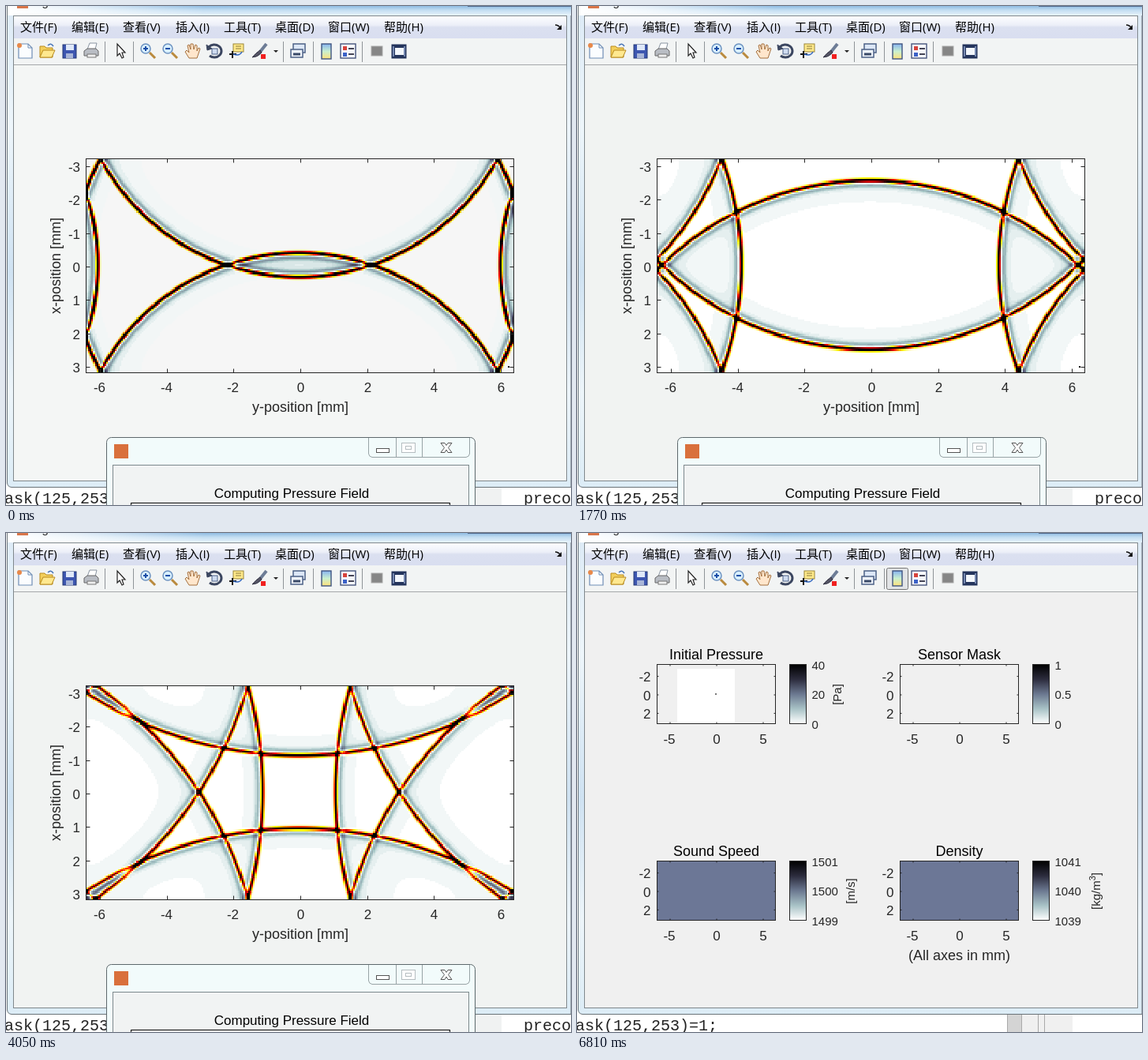
Write an HTML page with a canvas that moves like this. It is 716 px wide and 632 px high and loops after 8 s.

```html
<!DOCTYPE html>
<html lang="zh">
<head>
<meta charset="utf-8">
<title>Pressure field</title>
<style>
html, body { margin: 0; width: 100%; height: 100%; overflow: hidden; background: #fff; }
svg, canvas { position: absolute; left: 0; top: 0; }
canvas { left: 102px; top: 194px; width: 541px; height: 270px; image-rendering: pixelated; }
text { font-family: "Liberation Sans", Arial, sans-serif; fill: #262626; }
.menu text { font: 15px "Open Sans", "Noto Sans CJK SC", "Noto Sans CJK", sans-serif; fill: #000; }
.code text { font: 20px "Liberation Mono", monospace; fill: #222; }
</style>
</head>
<body>
<svg id="back" width="716" height="632" viewBox="0 0 716 632"></svg>
<canvas id="field" width="256" height="128"></canvas>
<svg id="front" width="716" height="632" viewBox="0 0 716 632"></svg>
<script>
const LOOP = 8000, NX = 256, NY = 128, CELL = 2.115;
const $ = id => document.getElementById(id);

// ---------- markup helpers ----------
const rect = (x, y, w, h, fill, more = '') =>
  `<rect x="${x}" y="${y}" width="${w}" height="${h}" fill="${fill}" ${more}/>`;
const path = (d, stroke, width = 1, fill = 'none') =>
  `<path d="${d}" stroke="${stroke}" stroke-width="${width}" fill="${fill}"/>`;
const text = (x, y, str, size, anchor = 'middle', more = '') =>
  `<text x="${x}" y="${y}" font-size="${size}" text-anchor="${anchor}" ${more}>${str}</text>`;
const upright = (x, y, str, size) =>
  text(0, 0, str, size, 'middle', `transform="translate(${x} ${y}) rotate(-90)"`);
const at = (x, body, y = 57) => `<g transform="translate(${x} ${y})">${body}</g>`;
const grad = (id, stops, dir = 'x2="0" y2="1"') =>
  `<linearGradient id="${id}" ${dir}>` +
  stops.map(([o, c]) => `<stop offset="${o}" stop-color="${c}"/>`).join('') + '</linearGradient>';

// ---------- window ----------
function lens(sign) {
  return path('M2 2L9 9', '#b98a3e', 3) +
    `<circle cx="-3" cy="-3" r="6" fill="#d8efff" stroke="#6c92c0" stroke-width="1.5"/>` +
    path(sign, '#1b4fa8', 2);
}

function toolbar() {
  const sheet = path('M-8 -9H4L9 -4V9H-8Z', '#6f8db5', 1.2, '#fbfdff') +
    path('M4 -9V-4H9', '#6f8db5') + `<circle cx="-7" cy="-7" r="3" fill="#e8894a"/>`;
  const folder = path('M-9 8V-6H-3L-1 -4H7V8Z', '#b98b1e', 1, '#f3cf5b') +
    path('M-9 8L-5 -1H10L6 8Z', '#b98b1e', 1, '#ffe88f') + path('M1 -7Q5 -11 8 -6', '#4a76b8', 1.5);
  const disk = rect(-8, -8, 17, 17, '#3d56b0', 'stroke="#253875"') +
    rect(-4, -8, 10, 7, '#dfe8f8') + rect(-4, 3, 9, 6, '#a9b6d8');
  const printer = path('M-5 -2L-2 -10H7L5 -2Z', '#8893a0', 1, '#fff') +
    path('M-9 0L-5 -3H6L9 0V6H-9Z', '#666', 1, '#b9bdc4') + rect(-5, 4, 11, 4, '#eee', 'stroke="#777"');
  const pointer = path('M-5 -9V6L-2 3L1 9L3 8L1 2H5Z', '#222', 1.2, '#fff');
  const hand = path('M-4 9L-9 1L-7 -1L-4 2L-6 -7L-4 -8L-2 -2L-2 -9L1 -9L2 -2L4 -8L6 -7L6 0L8 -4L10 -3L6 9Z',
    '#a5713f', 1, '#ffe6cc');
  const spin = path('M-7 -5A9 8 0 1 1 -6 6', '#3b4660', 3) + path('M-10 -8L-9 -1L-3 -3Z', '#3b4660', 1, '#3b4660') +
    rect(-3, -3, 7, 7, '#cfdcf0', 'stroke="#4c6187"');
  const tip = rect(-4, -9, 13, 10, '#ffe98a', 'stroke="#9a8638"') +
    path('M-1 -6H6M-1 -3H6', '#8a7a3c') + path('M-9 4H0M-5 0V9', '#111', 2) + path('M-4 4Q4 7 7 1', '#3468c0', 1.5);
  const brush = path('M9 -9L1 1', '#6d7c96', 4) + path('M1 -1Q-4 2 -9 8Q-2 8 3 2Z', '#334', 1, '#556') +
    rect(2, 4, 6, 6, '#f02020');
  const linked = rect(-6, -9, 15, 11, '#dce7f6', 'stroke="#4c6187" stroke-width="1.5"') +
    rect(-9, -2, 15, 10, '#eef3fa', 'stroke="#4c6187" stroke-width="1.5"') + path('M-6 4H3', '#3a4a68', 3);
  const bar = rect(-6, -9, 12, 19, 'url(#rain)', 'stroke="#3f5580" stroke-width="1.4"');
  const legend = rect(-9, -9, 19, 18, '#f7f9fd', 'stroke="#46557c" stroke-width="1.4"') +
    rect(-6, -6, 5, 5, '#d8433c') + rect(-6, 2, 5, 5, '#3c62c8') + path('M1 -3H8M1 4H8', '#445', 2);
  const gray = rect(-7, -6, 14, 12, '#868686', 'stroke="#aaa"');
  const dock = rect(-9, -8, 18, 17, '#24345c', 'stroke="#24345c"') + rect(-5, -4, 11, 9, '#f2f6fc') +
    path('M-7 -6V7M7 -6V7', '#8ea2cc', 1.5);
  const seps = [125, 161, 351, 389, 451].map(x => path(`M${x}.5 45V71`, '#8f9498')).join('');
  const icons = [[24, sheet], [52, folder], [80, disk], [108, printer], [146, pointer],
    [180, lens('M-6 -3H0M-3 -6V0')], [208, lens('M-6 -3H0')], [236, hand], [264, spin],
    [292, tip], [321, brush], [370, linked], [406, bar], [433, legend], [470, gray], [498, dock]];
  return rect(10, 41, 700, 33, '#f2f4f4') +
    rect(392.5, 44.5, 27, 27, '#e2e4e6', 'id="pressed" stroke="#777" rx="2"') + seps +
    icons.map(([x, body]) => at(x, body)).join('') +
    path('M339 56H345L342 59Z', 'none', 0, '#222') + path('M10 74.5H710', '#a5a8aa');
}

function chrome() {
  const menus = [[18, '文件(F)'], [83, '编辑(E)'], [148, '查看(V)'], [215, '插入(I)'],
    [276, '工具(T)'], [341, '桌面(D)'], [408, '窗口(W)'], [479, '帮助(H)']];
  return '<defs>' +
    grad('glass', [[0, '#8fbbe2'], [.45, '#c4def2'], [1, '#e8f3fb']]) +
    grad('glow', [[0, '#fff'], [.12, 'rgba(255,255,255,.75)'], [.35, 'rgba(255,255,255,0)']], 'x2="1" y2="0"') +
    grad('side', [[0, '#dceaf6'], [.25, '#eef6fb'], [.55, '#cfe2f2'], [.8, '#edf5fa'], [1, '#dcecf6']]) +
    grad('menu', [[0, '#fdfdff'], [.4, '#eceff8'], [.5, '#dbe0f0'], [1, '#d9def0']]) +
    grad('rain', [[0, '#88b4f0'], [.5, '#c9f0d0'], [1, '#ffe27a']]) + '</defs>' +
    rect(0, 0, 716, 632, '#fff') + rect(594, 609, 34, 23, '#f0f2f2') +
    `<g class="code">${text(-14, 630, 'mask(125,253)=1;', 20, 'start')}` +
    text(656, 630, 'preco', 20, 'start', 'id="aside"') + '</g>' +
    '<g id="strip">' + rect(545, 609, 18, 23, '#d4d4d4') + rect(564, 609, 64, 23, '#f0f0f0') +
    path('M545.5 609V632M563.5 609V632M584.5 609V632M592.5 609V632', '#aaa') + '</g>' +
    path('M1.5 0V604Q2 609 7 609.5H716V0Z', '#6a7378', 1, 'url(#side)') +
    rect(2, 0, 714, 12, 'url(#glass)') + rect(2, 0, 714, 12, 'url(#glow)') + path('M585 .5H716', '#51698c') +
    rect(14, 0, 14, 3, '#d9764a') + text(33, 0, 'Figure', 15, 'start') +
    rect(9.5, 12.5, 701, 589, '#f1f3f2', 'id="panel" stroke="#80888c"') +
    rect(10, 13, 700, 28, 'url(#menu)') + path('M10 41.5H710', '#b4b8c4') +
    '<g class="menu">' + menus.map(([x, s]) => text(x, 32, s, 15, 'start')).join('') + '</g>' +
    path('M696 24Q700 24 703 28', '#111', 1.6) + path('M704 24V30H698Z', 'none', 0, '#111') +
    toolbar();
}

function dialog() {
  return rect(127.5, 546.5, 467, 100, '#f2fbfb', 'rx="6" stroke="#5d686c"') +
    rect(137, 555, 18, 18, '#d9703c') +
    path('M459.5 547V567Q460 571 464 571.5H583Q587 571 587.5 567V547M494.5 547V571M527.5 547V571', '#98a3a6') +
    rect(469.5, 560.5, 16, 5, '#fff', 'stroke="#555"') +
    rect(501.5, 553.5, 17, 12, '#fff', 'stroke="#b5bdc0"') + rect(506.5, 557.5, 7, 4, '#fff', 'stroke="#b5bdc0"') +
    path('M551 553.5H556L558 556.5L560 553.5H565L560.5 559.5L565 565.5H560L558 562L556 565.5H551L555.5 559.5Z', '#555', 1, '#fff') +
    rect(135.5, 581.5, 451, 60, '#f1f3f3', 'stroke="#7d888c"') +
    text(362, 623, 'Computing Pressure Field', 17, 'middle', 'style="fill:#000"') +
    rect(158.5, 629.5, 404, 20, '#fff', 'stroke="#000"');
}

// ---------- axes ----------
function frame(x, y, w, h, xs, ys, len) {
  const r = x + w, b = y + h;
  const d = xs.map(v => `M${v} ${y}v${len}M${v} ${b}v${-len}`).join('') +
    ys.map(v => `M${x} ${v}h${len}M${r} ${v}h${-len}`).join('');
  return rect(x, y, w, h, 'none', 'stroke="#262626"') + path(d, '#262626');
}

function waveAxes() {
  const step = 42.35, xs = [-6, -4, -2, 0, 2, 4, 6], ys = [-3, -2, -1, 0, 1, 2, 3];
  const px = v => Math.round(373 + v * step) + .5, py = v => Math.round(330 + v * step) + .5;
  return frame(101.5, 193.5, 542, 271, xs.map(px), ys.map(py), 5) +
    xs.map(v => text(px(v) - (v < 0 ? 1 : 0), 489, v, 17)).join('') +
    ys.map(v => text(94, py(v) + 6, v, 17, 'end')).join('') +
    text(373, 514, 'y-position [mm]', 18) + upright(69, 329, 'x-position [mm]', 18) +
    rect(636, 456, 2, 2, '#000');
}

function summary() {
  const plot = (x, y, title, fill, marks, unit, ux) => {
    const xs = [-5, 0, 5].map(v => [v, x + 75.5 + v * 11.8]);
    const ys = [-2, 0, 2].map(v => [v, y + 38.5 + v * 11.7]);
    const inside = title === 'Initial Pressure'
      ? rect(127, 172, 73, 70, '#fff') + rect(175, 203, 2, 2, '#777') : '';
    return rect(x, y, 150, 75, fill) + inside +
      frame(x, y, 150, 75, xs.map(p => p[1]), ys.map(p => p[1]), 2) +
      xs.map(([v, p]) => text(p - (v < 0 ? 1 : 0), y + 100, v, 17)).join('') +
      ys.map(([v, p]) => text(x - 8, p + 6.5, v, 17, 'end')).join('') +
      text(x + 75, y - 7, title, 18, 'middle', 'style="fill:#000"') +
      rect(x + 168, y, 21, 75, 'url(#bone)', 'stroke="#262626"') +
      marks.map((m, i) => text(x + 196, y + 6 + i * 37.5, m, 15, 'start')).join('') +
      (unit ? upright(ux, y + 38, unit, 15) : '');
  };
  const blue = '#6c7796', pale = '#f0f0f0';
  const cube = '[kg/m<tspan font-size="11" dy="-6">3</tspan><tspan dy="6">]</tspan>';
  return '<defs>' + grad('bone', [[0, '#000'], [.25, '#2c2c3d'], [.5, '#6b7890'], [.75, '#a8c2c6'], [1, '#fff']]) + '</defs>' +
    plot(101.5, 166.5, 'Initial Pressure', pale, [40, 20, 0], '[Pa]', 335) +
    plot(409.5, 166.5, 'Sensor Mask', pale, [1, 0.5, 0]) +
    plot(101.5, 415.5, 'Sound Speed', blue, [1501, 1500, 1499], '[m/s]', 352) +
    plot(409.5, 415.5, 'Density', blue, [1041, 1040, 1039], cube, 663) +
    text(484.5, 541, '(All axes in mm)', 18);
}

// ---------- wave field ----------
const ctx = $('field').getContext('2d');
const img = ctx.createImageData(NX, NY);
const clamp = v => Math.max(0, Math.min(1, v));

// Positive pressure runs white-yellow-red-black, negative fades to blue-grey.
function shade(v) {
  if (v >= 0) {
    const x = 1 - Math.min(v, 1);
    return [clamp(x / .375), clamp((x - .375) / .375), clamp((x - .75) * 4)];
  }
  v = Math.round(v / .05) * .05;
  const x = 1 - .73 * Math.min(-v, 1), g = x * .875;
  return [g + clamp((x - .75) * 4) / 8, g + clamp((x - .375) / .375) / 8, g + clamp(x / .375) / 8];
}

// Sharp front at s = 0, a narrow trough behind it, then the slow wake of a 2D wave.
function pulse(s) {
  let v = s < 5 ? 1.32 * Math.exp(-s * s / 1.15) : 0;
  if (s > .5) v -= 1.2 * s ** -1.5 * (1 - Math.exp(-((s / 2.6) ** 4)));
  if (s > .5 && s < 8) v -= .32 * Math.exp(-(((s - 3) / 1.2) ** 2));
  return v;
}

function drawField(radius, white) {
  const R = radius / CELL, gain = Math.sqrt(286 / radius), px = img.data;
  for (let j = 0, k = 0; j < NY; j++) {
    for (let i = 0; i < NX; i++, k += 4) {
      let v = 0;
      for (let n = -3; n <= 3; n++) {
        for (let m = -1; m <= 1; m++) {
          const dx = i - 127 - m * NX, dy = j - 63 - n * NY;
          const s = R - Math.sqrt(dx * dx + dy * dy);
          if (s > -4) v += pulse(s);
        }
      }
      const c = shade(v * gain);
      for (let q = 0; q < 3; q++) px[k + q] = Math.min(white, c[q] * 255);
      px[k + 3] = 255;
    }
  }
  ctx.putImageData(img, 0, 0);
}

// ---------- timing ----------
const bursts = [[150, 1080, 8], [1230, 2190, 8], [2340, 3240, 8], [3390, 4290, 8],
  [4440, 5340, 7], [5490, 6420, 8], [6540, 6810, 3]];
const ticks = bursts.flatMap(([a, b, n]) =>
  Array.from({ length: n }, (_, i) => Math.floor((a + (b - a) * i / (n - 1)) / 30 + 1e-6) * 30));
const growth = [[0, 286], [9, 350], [17, 406], [24, 450], [35, 533], [42, 577], [50, 632]];

function radiusAt(step) {
  let i = 0;
  while (step > growth[i + 1][0]) i++;
  const [a, ra] = growth[i], [b, rb] = growth[i + 1];
  return ra + (rb - ra) * (step - a) / (b - a);
}

$('back').innerHTML = chrome();
$('front').innerHTML = `<g id="wave">${waveAxes()}${dialog()}</g><g id="summary">${summary()}</g>`;

const show = (id, on) => { $(id).style.display = on ? '' : 'none'; };
let last = -1;

function render(t) {
  const step = ticks.filter(v => v <= t).length;
  if (step === last) return;
  last = step;
  const done = step === ticks.length;
  ['wave', 'field', 'aside'].forEach(id => show(id, !done));
  ['summary', 'pressed', 'strip'].forEach(id => show(id, done));
  $('panel').setAttribute('fill', done ? '#f0f0f0' : step ? '#f1f3f2' : '#f4f6f5');
  if (!done) drawField(radiusAt(step), step ? 255 : 246);
}

const start = performance.now();
function loop() {
  render((performance.now() - start) % LOOP);
  requestAnimationFrame(loop);
}
loop();
</script>
</body>
</html>
```
